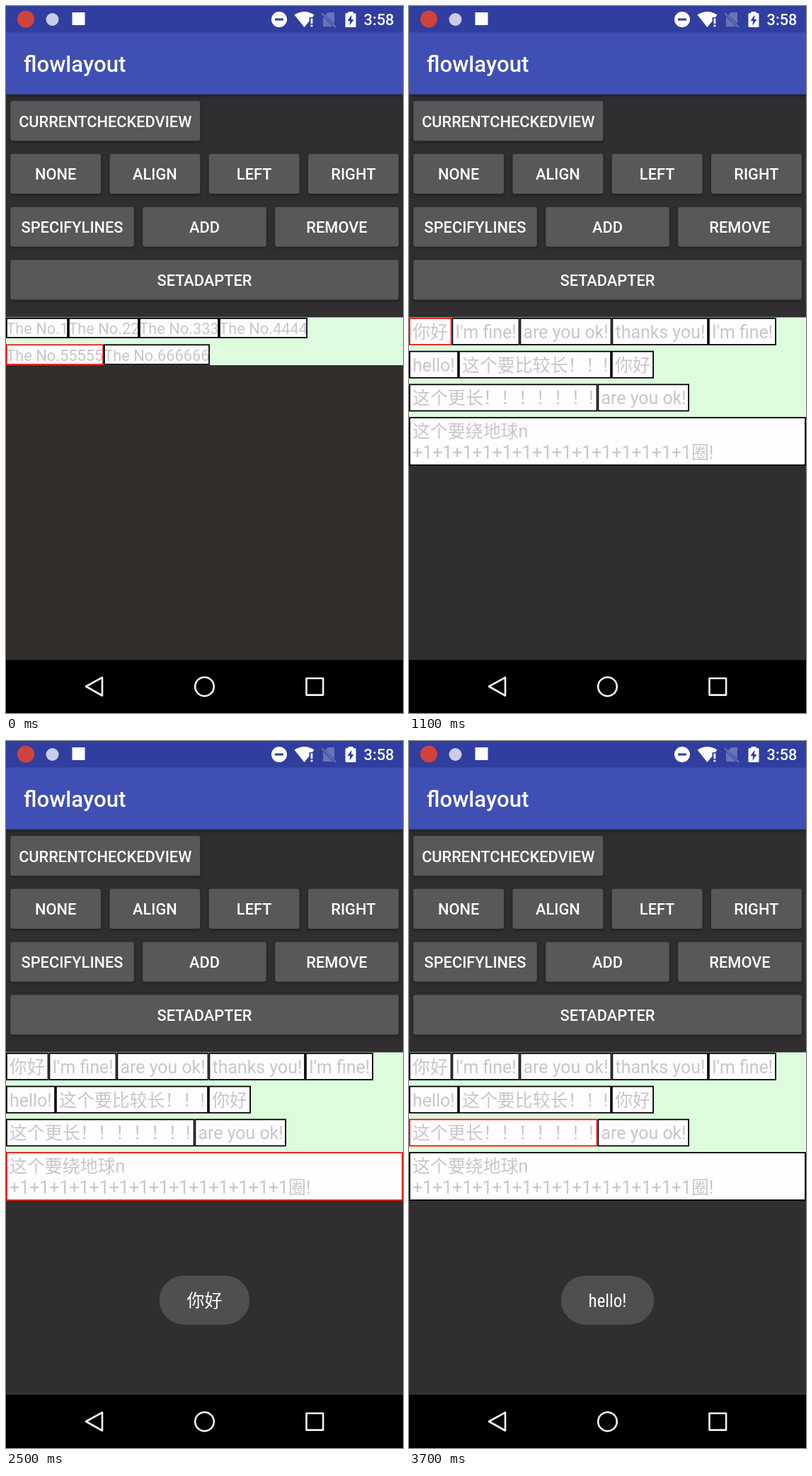
An HTML page with a canvas that plays this animation: 561 by 998 pixels, repeating every 3800 ms.

```html
<!DOCTYPE html>
<html lang="zh-CN">
<head>
<meta charset="utf-8">
<title>flowlayout</title>
<style>
html, body { margin: 0; width: 100%; height: 100%; overflow: hidden; background: #302e31; }
canvas { display: block; width: 561px; height: 998px; }
</style>
</head>
<body>
<canvas id="stage" width="561" height="998"></canvas>
<script>
const ctx = document.getElementById('stage').getContext('2d');
const LOOP = 3800, STEP = 100;
const W = 561, H = 998;
const DP = W / 360;
const FAMILY = 'Roboto, "Noto Sans CJK SC", "Noto Sans CJK", sans-serif';
const WHITE = '#fffdff';

// Each tag: text, left edge, right edge
const numberRows = [
  { y: 440, h: 29, tags: [['The No.1', 0, 88], ['The No.22', 88, 188], ['The No.333', 188, 301], ['The No.4444', 301, 426]] },
  { y: 477.4, h: 29.4, tags: [['The No.55555', 0, 138], ['The No.666666', 138, 288]] }
];
const phraseRows = [
  { y: 440, h: 39, tags: [['你好', 0, 60.5], ["I'm fine!", 60.5, 156.5], ['are you ok!', 156.5, 286.5], ['thanks you!', 286.5, 423], ["I'm fine!", 423, 519]] },
  { y: 486.7, h: 39, tags: [['hello!', 0, 70], ['这个要比较长！！!', 70, 286], ['你好', 286, 346]] },
  { y: 533.4, h: 39, tags: [['这个更长！！！！！！!', 0, 266.5], ['are you ok!', 266.5, 396]] },
  { y: 580.2, h: 68.8, tags: [['这个要绕地球n\n' + '+1'.repeat(14) + '圈!', 0, 561]] }
];

const clamp = v => Math.max(0, Math.min(1, v));

function rect(x, y, w, h, color) {
  ctx.fillStyle = color;
  ctx.fillRect(x, y, w, h);
}

function round(x, y, w, h, r, color) {
  ctx.fillStyle = color;
  ctx.beginPath();
  ctx.roundRect(x, y, w, h, r);
  ctx.fill();
}

function disc(x, y, r, color) {
  ctx.fillStyle = color;
  ctx.beginPath();
  ctx.arc(x, y, r, 0, Math.PI * 2);
  ctx.fill();
}

function path(points, close = true) {
  ctx.beginPath();
  points.forEach(([x, y]) => ctx.lineTo(x, y));
  if (close) ctx.closePath();
}

function label(str, x, y, sp, color, weight = 400, align = 'left') {
  ctx.font = `${weight} ${sp * DP}px ${FAMILY}`;
  ctx.textAlign = align;
  ctx.fillStyle = color;
  ctx.fillText(str, x, y);
}

function shadow(blur, dy, alpha) {
  ctx.shadowColor = `rgba(0,0,0,${alpha})`;
  ctx.shadowBlur = blur;
  ctx.shadowOffsetY = dy;
}

function button(str, row, x, width, lift = 0) {
  const y = 124.7 + row * 48 * DP + 6 * DP;
  ctx.save();
  shadow(4 + lift * 8, 2 + lift * 4, 0.35);
  round(x + 4 * DP, y, width - 8 * DP, 36 * DP, 3, '#59575a');
  ctx.restore();
  label(str, x + width / 2, y + 36.6, 14, WHITE, 500, 'center');
}

function buttonRow(names, row) {
  const w = W / names.length;
  names.forEach((name, i) => button(name, row, i * w, w));
}

function statusBar() {
  disc(28, 18.5, 12, '#d0433a');
  disc(65.5, 19, 9, '#c9cde8');
  rect(93.5, 9, 18, 18, WHITE);

  disc(386, 19, 11, WHITE);
  rect(380, 17.5, 12, 3, '#303e9f');

  // Wi-Fi fan with a warning mark
  ctx.fillStyle = WHITE;
  ctx.beginPath();
  ctx.moveTo(421.5, 30);
  ctx.lineTo(407.5, 12.5);
  ctx.quadraticCurveTo(421.5, 3.5, 435.5, 12.5);
  ctx.lineTo(433, 16);
  ctx.lineTo(428.5, 16);
  ctx.lineTo(428.5, 21.5);
  ctx.fill();
  rect(430.5, 17.5, 2.8, 7.5, WHITE);
  rect(430.5, 26.5, 2.8, 2.8, WHITE);

  // Missing SIM card
  const dim = '#6973b8';
  path([[451, 13], [455, 9], [464, 9], [464, 25]]);
  ctx.fillStyle = dim;
  ctx.fill();
  path([[448, 15], [448, 29], [462, 29]]);
  ctx.fill();
  ctx.strokeStyle = dim;
  ctx.lineWidth = 2;
  path([[446, 10], [466, 30]], false);
  ctx.stroke();

  rect(483.5, 8, 7, 4, WHITE);
  round(479.5, 10, 15, 20, 1.5, WHITE);
  ctx.fillStyle = '#303e9f';
  path([[488.5, 12.5], [482.5, 21], [486, 21], [485.5, 27.5], [491.5, 19], [488, 19]]);
  ctx.fill();

  label('3:58', 548.5, 27, 14, WHITE, 500, 'right');
}

function navBar() {
  rect(0, 923, W, H - 923, '#000');
  ctx.strokeStyle = '#f4f2f4';
  ctx.lineWidth = 2.6;
  ctx.lineJoin = 'round';
  path([[113, 960.5], [136, 947.8], [136, 973.5]]);
  ctx.stroke();
  ctx.beginPath();
  ctx.arc(280.5, 960.8, 13.3, 0, Math.PI * 2);
  ctx.stroke();
  ctx.strokeRect(424.5, 949, 23.6, 23.6);
  ctx.lineJoin = 'miter';
}

function tagRows(rows, checked, sp, pad, base) {
  for (const { y, h, tags } of rows) {
    for (const [str, x0, x1] of tags) {
      rect(x0, y, x1 - x0, h, WHITE);
      str.split('\n').forEach((line, i) => label(line, x0 + pad, y + base + i * 29.6, sp, '#c9c6ca'));
      ctx.strokeStyle = checked === y + ':' + x0 ? '#e8150c' : '#000';
      ctx.lineWidth = 1.8;
      ctx.strokeRect(x0 + 0.9, y + 0.9, x1 - x0 - 1.8, h - 1.8);
    }
  }
}

function toast(str, width, alpha, narrow) {
  if (alpha <= 0) return;
  ctx.save();
  ctx.globalAlpha = alpha;
  round(280.5 - width / 2, 754.7, width, 69, 34.5, '#504e51');
  if (narrow) {
    ctx.font = `400 ${16 * DP}px "Roboto Condensed", ${FAMILY}`;
    ctx.fontStretch = 'condensed';
    ctx.textAlign = 'center';
    ctx.fillStyle = WHITE;
    ctx.fillText(str, 280.5, 798.5);
  } else {
    label(str, 280.5, 798.5, 16, WHITE, 400, 'center');
  }
  ctx.restore();
}

function checkedTag(t) {
  if (t < 1100) return '';
  if (t < 1700) return '440:0';
  if (t < 2500) return '486.7:0';
  if (t < 3400) return '580.2:0';
  return '533.4:0';
}

function draw(t) {
  const first = t < 100;
  rect(0, 0, W, H, '#302e31');
  if (first) rect(0, 507, W, 416, '#322e2c');

  ctx.save();
  shadow(6, 2, 0.4);
  rect(0, 37, W, 87.7, '#3f4fb4');
  ctx.restore();
  rect(0, 0, W, 37.4, '#303e9f');
  statusBar();
  label('flowlayout', 25, 93, 20, WHITE, 500);

  button('CURRENTCHECKEDVIEW', 0, 0, W / 2);
  buttonRow(['NONE', 'ALIGN', 'LEFT', 'RIGHT'], 1);
  buttonRow(['SPECIFYLINES', 'ADD', 'REMOVE'], 2);
  button('SETADAPTER', 3, 0, W, first ? 0 : clamp((400 - t) / 300));

  if (first) {
    rect(0, 439.5, W, 67.5, '#dffbdf');
    tagRows(numberRows, '477.4:0', 14, 0.3, 23.4);
  } else {
    const touch = clamp((200 - t) / 100);
    if (touch) disc(115, 394, 16, `rgba(126,125,128,${0.45 * touch})`);
    rect(0, 439.5, W, 209.5, '#ddfbdd');
    tagRows(phraseRows, checkedTag(t), 16, 5, 29);
  }

  const swap = clamp((t - 3150) / 400);
  toast('你好', 127.5, clamp((t - 1130) / 400) * (1 - swap));
  toast('hello!', 131.5, swap, true);
  navBar();
}

const start = performance.now();
function tick() {
  const t = (performance.now() - start) % LOOP;
  draw(Math.floor(t / STEP) * STEP);
  requestAnimationFrame(tick);
}
tick();
</script>
</body>
</html>
```
